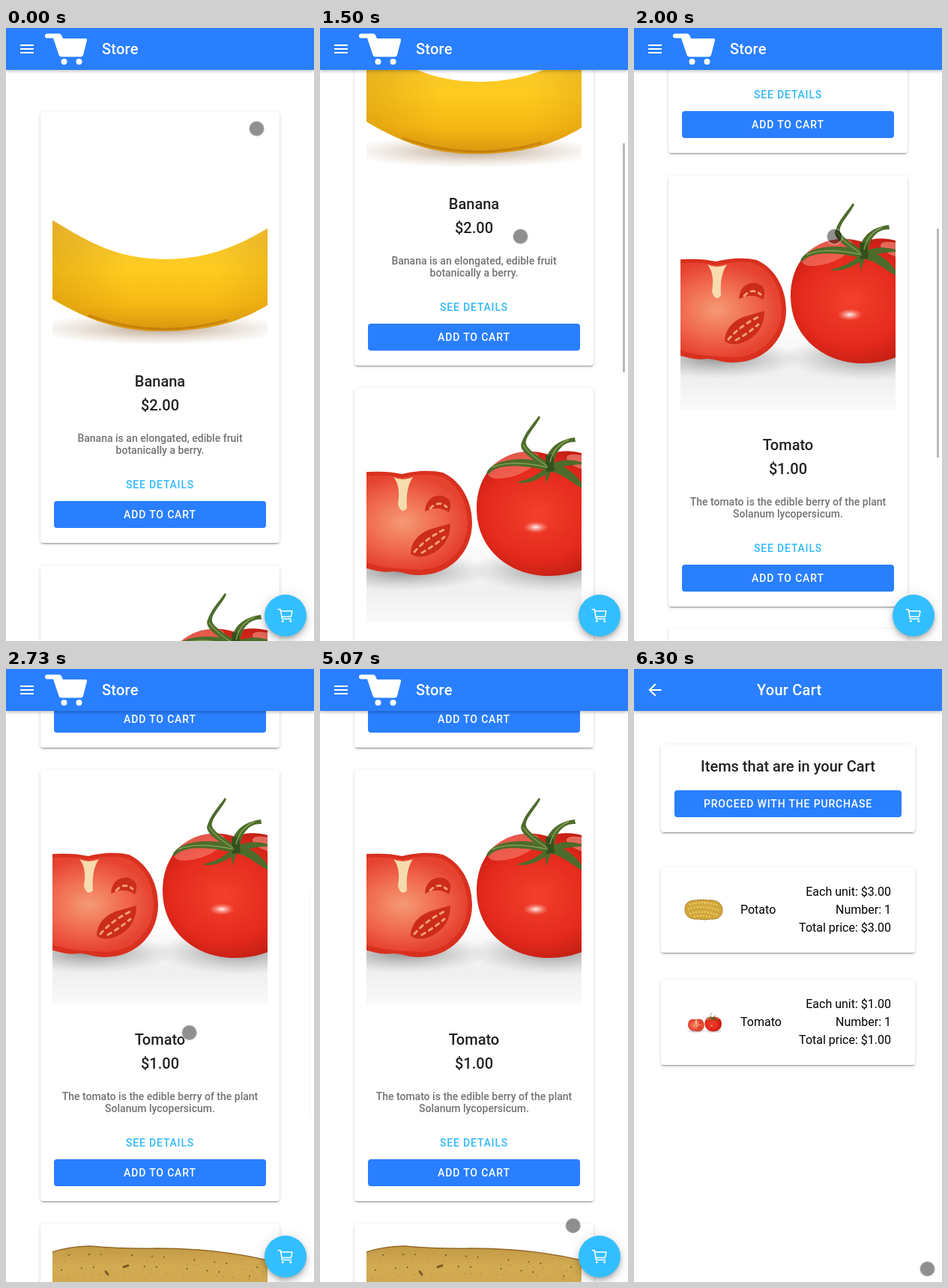
An HTML page that plays this animation: 411x819 px, repeating every 8000 ms.

```html
<!DOCTYPE html>
<html lang="en">
<head>
<meta charset="utf-8">
<title>Store</title>
<style>
@property --y { syntax: "<length>"; inherits: true; initial-value: 0px; }
html, body { margin: 0; width: 100%; height: 100%; overflow: hidden; background: #fff; }
#stage { position: relative; width: 411px; height: 819px; overflow: hidden; font: 500 14px Roboto, sans-serif; color: #222; }
#stage * { box-sizing: border-box; }
.page, header, .card, .card > *, .fab, .thumb, .cursor, .ripple, header > * { position: absolute; }
.page { inset: 0; background: #fff; }
header { left: 0; top: 0; width: 411px; height: 56px; background: #297fff; box-shadow: 0 2px 4px rgba(0,0,0,.24); }
header svg { left: 0; top: 0; fill: #fff; }
header span { top: 0; font-size: 20px; line-height: 56px; letter-spacing: .0125em; color: #fff; white-space: nowrap; }

.card { left: 46px; width: 319px; height: 576px; border-radius: 4px; background: #fff;
  box-shadow: 0 3px 1px -2px rgba(0,0,0,.2), 0 2px 2px rgba(0,0,0,.14), 0 1px 5px rgba(0,0,0,.12); }
.card > p { left: 0; width: 100%; margin: 0; text-align: center; white-space: nowrap; }
.pic { left: 16px; top: 26px; width: 287px; height: 287px; }
.name, .price { font-size: 20px; line-height: 24px; }
.name { top: 348px; }
.price { top: 380px; }
.desc { top: 428px; line-height: 16px; color: #737373; }
.more { top: 490px; line-height: 16px; letter-spacing: .06em; color: #33b9fa; }
.btn { left: 18px; right: 18px; top: 520px; height: 36px; border-radius: 4px; overflow: hidden; background: #297fff;
  color: #fff; text-align: center; line-height: 36px; letter-spacing: .06em; white-space: nowrap; }
.fab { left: 345px; top: 757px; width: 56px; height: 56px; border-radius: 50%; overflow: hidden; background: #33bfff;
  box-shadow: 0 3px 5px -1px rgba(0,0,0,.2), 0 6px 10px rgba(0,0,0,.14), 0 1px 18px rgba(0,0,0,.12); }
.fab svg { position: absolute; left: 16px; top: 16px; fill: none; stroke: #fff; stroke-width: 32; stroke-linejoin: round; stroke-linecap: round; }
.ripple { border-radius: 50%; background: #fff; opacity: 0; }
.btn .ripple { left: -11px; top: -212px; width: 480px; height: 480px; animation: tap 8s infinite; }
.fab .ripple { left: -12px; top: -12px; width: 80px; height: 80px; animation: fabTap 8s infinite; }

.store { animation: scroll 8s step-end infinite; }
.list { position: absolute; inset: 0; transform: translateY(calc(var(--y) * -1)); }
.thumb { left: 404px; top: 59px; width: 3px; height: 306px; background: #b9b9b9; transform: translateY(calc(var(--y) * .401)); animation: thumb 8s infinite; }
.cart { opacity: 0; animation: enter 8s infinite; }
.cart .card { left: 36px; width: 339px; height: 114px; font: 400 16px/24px Roboto, sans-serif; color: #000; }
.cart .card > .label { left: 106px; top: 45px; width: auto; }
.cart .card > .sum { left: auto; right: 32px; top: 21px; width: auto; text-align: right; }
.cart .card.head { top: 101px; height: 117px; color: #222; }
.cart .head .name { top: 17px; font-weight: 500; font-size: 20px; }
.cart .head .btn { top: 61px; font: 500 14px/36px Roboto, sans-serif; }
.cursor { left: -11px; top: -11px; width: 22px; height: 22px; border-radius: 50%; border: 1.5px solid rgba(255,255,255,.5);
  background: rgba(0,0,0,.44) padding-box; animation: cursor 8s infinite linear; }

@keyframes scroll {
  0% { --y: 0px } 15% { --y: 40px }
  17.875% { --y: 120px } 18.375% { --y: 180px } 18.75% { --y: 237px }
  19.125% { --y: 287px } 19.625% { --y: 330px } 20% { --y: 368px }
  20.375% { --y: 403px } 20.875% { --y: 428px } 21.25% { --y: 440px }
  23.375% { --y: 452px } 23.75% { --y: 468px } 24.125% { --y: 486px }
  24.625% { --y: 504px } 25% { --y: 521px } 26.25%, 100% { --y: 583px }
}
@keyframes thumb {
  0%, 14.99% { opacity: 0 } 15%, 32.25% { opacity: 1 } 35%, 100% { opacity: 0 }
}
@keyframes cursor {
  0%, 1.75% { transform: translate(334.5px, 134.5px); animation-timing-function: ease-in-out }
  9.625%, 30.5% { transform: translate(267.5px, 278.5px); animation-timing-function: ease-in }
  32.5% { transform: translate(250px, 360px) }
  33.75% { transform: translate(242px, 460px) }
  35.25% { transform: translate(252px, 560px); animation-timing-function: ease-out }
  37.875%, 39.25% { transform: translate(293px, 655px); animation-timing-function: ease-in-out }
  42.5% { transform: translate(331px, 712px); animation-timing-function: ease-in-out }
  45.375%, 60.375% { transform: translate(293.5px, 683.5px); animation-timing-function: ease-in }
  63.375% { transform: translate(337.5px, 743.5px) }
  66.25% { transform: translate(369px, 795px); animation-timing-function: ease-out }
  69.125%, 100% { transform: translate(391.5px, 801.5px) }
}
@keyframes tap {
  0%, 56% { opacity: 0; transform: scale(.05) }
  56.25% { opacity: .1; transform: scale(.1) }
  59% { opacity: .16; transform: none }
  61.25%, 100% { opacity: 0; transform: none }
}
@keyframes fabTap {
  0%, 66.25% { opacity: 0; transform: scale(.1) }
  67.5% { opacity: .16; transform: none }
  69.125%, 100% { opacity: 0; transform: none }
}
@keyframes enter {
  0%, 75.25% { opacity: 0; transform: translateY(40px); animation-timing-function: cubic-bezier(.36,.66,.04,1) }
  78.75%, 100% { opacity: 1; transform: none }
}
</style>
</head>
<body>
<svg width="0" height="0" style="position:absolute">
  <defs>
    <linearGradient id="peel" x2="0" y2="1">
      <stop stop-color="#f5c53a"/><stop offset=".45" stop-color="#fecb1f"/><stop offset=".75" stop-color="#f6b914"/><stop offset="1" stop-color="#d9940f"/>
    </linearGradient>
    <linearGradient id="ends">
      <stop stop-color="#b97a05" stop-opacity=".3"/><stop offset=".35" stop-color="#b97a05" stop-opacity="0"/>
      <stop offset=".75" stop-color="#b97a05" stop-opacity="0"/><stop offset="1" stop-color="#b97a05" stop-opacity=".2"/>
    </linearGradient>
    <radialGradient id="brown"><stop stop-color="#6b3c10" stop-opacity=".85"/><stop offset="1" stop-color="#b08a60" stop-opacity="0"/></radialGradient>
    <radialGradient id="grey"><stop stop-color="#777" stop-opacity=".75"/><stop offset="1" stop-color="#999" stop-opacity="0"/></radialGradient>
    <radialGradient id="red" cx=".42" cy=".5" r=".62">
      <stop stop-color="#f3402c"/><stop offset=".6" stop-color="#e3291c"/><stop offset="1" stop-color="#b51a10"/>
    </radialGradient>
    <radialGradient id="flesh"><stop stop-color="#f59a74"/><stop offset=".6" stop-color="#f0664c"/><stop offset="1" stop-color="#e5422f"/></radialGradient>
    <radialGradient id="shine"><stop stop-color="#fff" stop-opacity=".95"/><stop offset="1" stop-color="#ff9a88" stop-opacity="0"/></radialGradient>
    <linearGradient id="table" x2="0" y2="1"><stop offset=".6" stop-color="#fff"/><stop offset=".85" stop-color="#efefef"/><stop offset="1" stop-color="#fafafa"/></linearGradient>
    <linearGradient id="skin" x2="0" y2="1"><stop stop-color="#c39a45"/><stop offset=".12" stop-color="#d3ab52"/><stop offset="1" stop-color="#b88d35"/></linearGradient>
    <g id="tomato">
      <ellipse cx="110" cy="380" rx="115" ry="26" fill="url(#grey)"/>
      <ellipse cx="312" cy="378" rx="112" ry="30" fill="url(#grey)"/>
      <path id="half" d="M110 250C125 246 146 244 164 248C190 260 203 288 203 315C203 352 176 385 132 385C116 385 109 380 98 380C82 382 76 379 62 376C34 366 16 340 18 308C20 272 38 248 66 247C84 246 96 247 110 250Z" fill="#d9301f"/>
      <path d="M110 255C130 250 150 249 163 254C186 264 197 290 197 315C197 348 172 377 132 378C112 376 86 377 64 369C38 360 23 336 24 308C26 276 42 252 68 252C84 251 98 252 110 255Z" fill="url(#flesh)"/>
      <path d="M98 254Q110 260 124 254Q114 268 116 296Q108 304 104 290Q108 266 98 254Z" fill="#f6dcae"/>
      <path d="M140 300Q142 277 164 279Q179 284 172 301Q158 291 140 300ZM121 356Q122 334 146 324L174 316Q174 346 146 358Q130 364 121 356Z" fill="#cc2c1c"/>
      <path d="M126 354Q142 335 170 322M136 355Q152 346 166 334M147 296Q158 284 169 294" fill="none" stroke="#f2a070" stroke-width="3" stroke-linecap="round" stroke-dasharray="5 6"/>
      <path d="M306 224C338 209 403 228 403 300C403 354 360 386 306 386C252 386 209 350 209 296C209 238 256 208 306 224Z" fill="url(#red)"/>
      <ellipse cx="258" cy="238" rx="36" ry="14" transform="rotate(-20 258 238)" fill="#ff9d8c" opacity=".45"/>
      <ellipse cx="352" cy="235" rx="24" ry="9" transform="rotate(18 352 235)" fill="#ffb0a0" opacity=".5"/>
      <ellipse cx="288" cy="321" rx="17" ry="8" fill="url(#shine)"/>
      <g fill="#4d6c2b">
        <path d="M301 242C282 229 264 218 269 208C274 193 284 184 292 172L294 174C288 187 273 200 275 210C278 219 296 228 308 238Z"/>
        <path d="M300 239C302 216 318 204 340 201L341 207C325 206 313 219 312 240Z"/>
        <path d="M304 236C276 225 229 229 222 249L225 250C235 236 270 237 303 245Z"/>
        <path d="M303 239C290 253 278 257 262 261C277 265 296 256 309 244Z"/>
        <path d="M306 236C328 237 346 253 354 271C336 263 324 248 304 246Z"/>
        <path d="M308 236Q334 226 356 237Q330 236 308 246Z"/>
        <path d="M300 244L302 263L309 243Z"/>
      </g>
      <path d="M301 225L311 224L313 246L302 247Z" fill="#34501d"/>
      <path d="M271 211Q277 222 303 239M307 234Q312 212 332 204M304 241Q254 230 230 241" fill="none" stroke="#86a255" stroke-width="1.4"/>
    </g>
  </defs>
</svg>

<div id="stage">
  <div class="page store">
    <div class="list">
      <div class="card" style="top:112px">
        <svg class="pic" viewBox="62 138 287 287">
          <ellipse cx="205" cy="402" rx="175" ry="22" fill="url(#brown)" opacity=".55"/>
          <path id="banana" d="M62 257C112 287 148 309 214 309C276 309 318 286 349 268V370C314 391 276 405 206 405C140 405 98 383 62 362Z" fill="url(#peel)"/>
          <path d="M62 257C112 287 148 309 214 309C276 309 318 286 349 268V288C310 311 270 326 206 326C140 326 100 296 62 274Z" fill="#ffe067"/>
          <use href="#banana" style="fill:url(#ends)"/>
          <path d="M62 257C112 287 148 309 214 309C276 309 318 286 349 268V370C314 391 276 405 206 405C140 405 98 383 62 362Z" fill="url(#ends)"/>
          <path d="M110 384Q202 417 296 390" fill="none" stroke="#a86508" stroke-width="3" opacity=".45"/>
        </svg>
        <p class="name">Banana</p>
        <p class="price">$2.00</p>
        <p class="desc">Banana is an elongated, edible fruit<br>botanically a berry.</p>
        <p class="more">SEE DETAILS</p>
        <div class="btn">ADD TO CART</div>
      </div>
      <div class="card" style="top:718px">
        <svg class="pic" viewBox="62 161 287 287">
          <path d="M62 161H349V448H62Z" fill="url(#table)"/>
          <use href="#tomato"/>
        </svg>
        <p class="name">Tomato</p>
        <p class="price">$1.00</p>
        <p class="desc">The tomato is the edible berry of the plant<br>Solanum lycopersicum.</p>
        <p class="more">SEE DETAILS</p>
        <div class="btn">ADD TO CART<i class="ripple"></i></div>
      </div>
      <div class="card" style="top:1324px">
        <svg class="pic" viewBox="62 767 287 287">
          <path d="M62 779Q82 772 112 771Q160 775 202 774Q280 774 349 790V1000H62Z" fill="url(#skin)"/>
          <path d="M62 779Q82 772 112 771Q160 775 202 774Q280 774 349 790" fill="none" stroke="#92692a" stroke-width="1.5"/>
          <g fill="none" stroke="#7c5a22" stroke-linecap="round">
            <path d="M84 783Q180 778 340 800M74 803Q190 790 330 812" stroke-width="2.2" stroke-dasharray="0 27 0 16 0 41"/>
            <path d="M66 792Q190 786 345 806M70 814Q200 800 340 817" stroke-width="1.3" stroke-dasharray="0 13 0 22 0 9" opacity=".6"/>
            <path d="M157 799l6-2M133 805l3 4" stroke-width="3"/>
          </g>
        </svg>
      </div>
    </div>
    <div class="thumb"></div>
    <header>
      <svg width="120" height="56">
        <path d="M19 22h18v2H19zM19 27h18v2H19zM19 32h18v2H19z"/>
        <path d="M55 7.5H71Q73 7.5 74 9.5L76 14H106Q108.5 14 108 16.5L103 36Q102 38.5 100 38.5H74Q71.5 38.5 70.5 36L63 13.5H55a3 3 0 0 1 0-6z"/>
        <circle cx="77.5" cy="45" r="4"/><circle cx="97.5" cy="45" r="4"/>
      </svg>
      <span style="left:128px">Store</span>
    </header>
    <div class="fab">
      <svg width="24" height="24" viewBox="0 0 512 512">
        <circle cx="176" cy="416" r="16"/><circle cx="400" cy="416" r="16"/>
        <path d="M48 80h64l48 272h256M160 288h249.4a8 8 0 0 0 7.9-6.4l28.8-144a8 8 0 0 0-7.9-9.6H128"/>
      </svg>
      <i class="ripple"></i>
    </div>
  </div>

  <div class="page cart">
    <header>
      <svg width="56" height="56"><path transform="translate(15 15) scale(1.08)" d="M20 11H7.83l5.59-5.59L12 4l-8 8 8 8 1.41-1.41L7.83 13H20z"/></svg>
      <span style="left:164px">Your Cart</span>
    </header>
    <div class="card head">
      <p class="name">Items that are in your Cart</p>
      <div class="btn">PROCEED WITH THE PURCHASE</div>
    </div>
    <div class="card" style="top:265px">
      <svg style="left:30px;top:40px" width="54" height="34">
        <path d="M2 16C2 7 8 4 17 4Q24 2.500 32 4C44 3 52 8 52 17C52 26 45 30 36 29Q28 31 20 29C10 30 2 26 2 16Z" fill="#d2a83b" stroke="#a57c28"/>
        <path d="M8 10Q26 4 46 11M6 16Q26 9 48 18M8 22Q26 16 46 24M14 26Q26 23 38 27" fill="none" stroke="#efd06e" stroke-width="2" stroke-dasharray="2 2"/>
      </svg>
      <p class="label">Potato</p>
      <p class="sum">Each unit: $3.00<br>Number: 1<br>Total price: $3.00</p>
    </div>
    <div class="card" style="top:415px">
      <svg style="left:34.6px;top:43.400px" width="47" height="33.400" viewBox="8 161 404 287"><use href="#tomato"/></svg>
      <p class="label">Tomato</p>
      <p class="sum">Each unit: $1.00<br>Number: 1<br>Total price: $1.00</p>
    </div>
  </div>
  <div class="cursor"></div>
</div>
</body>
</html>
```
